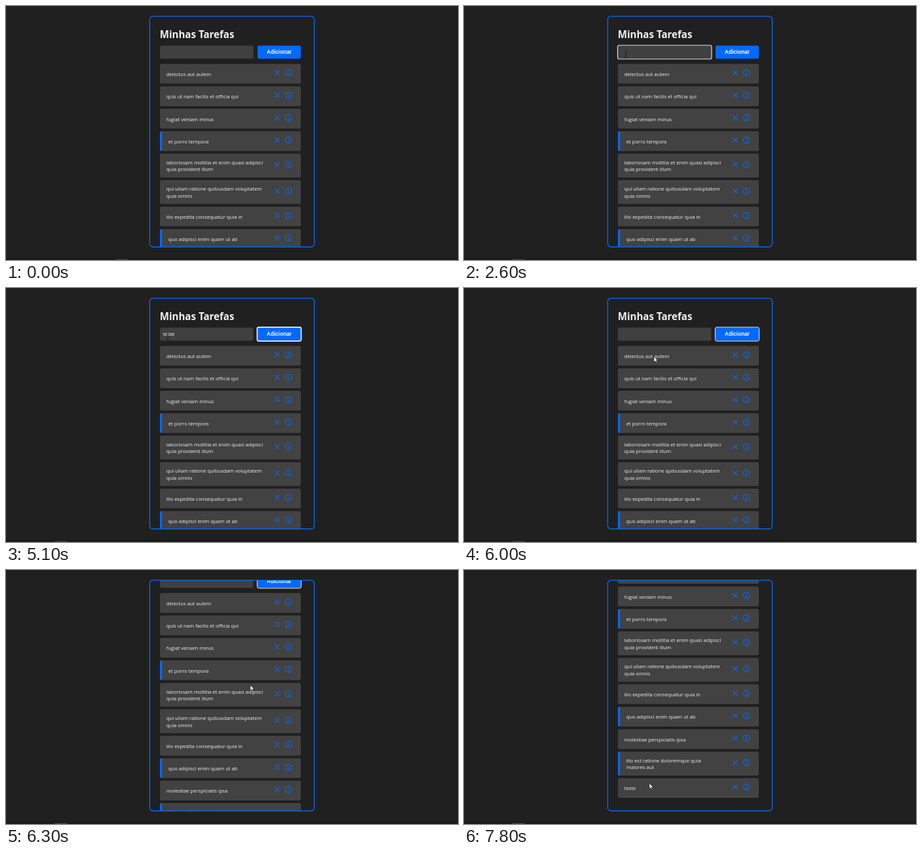
Write an HTML page that moves like this. It is 690 px wide and 388 px high and loops after 8000 ms.

```html
<!DOCTYPE html>
<html lang="pt">
<head>
<meta charset="utf-8">
<title>Minhas Tarefas</title>
<style>
  html, body { margin: 0; width: 100%; height: 100%; overflow: hidden; background: #202020; }
  svg { display: block; width: 100%; height: 100%; }
  text { font-family: "Open Sans", "Noto Sans", sans-serif; fill: #f0f0f0; white-space: pre; }
  .item { font-size: 7.65px; }
  .title { font-size: 15.1px; font-weight: 700; }
  .field, .button { font-family: "Liberation Sans", Arial, sans-serif; }
  .field { font-size: 8px; }
  .button { font-size: 8.2px; font-weight: 700; text-anchor: middle; fill: #fff; }
  .icon { fill: none; stroke: #0868ee; stroke-width: 1.15; stroke-linecap: round; }
</style>
</head>
<body>
<svg viewBox="0 0 690 388">
  <defs>
    <clipPath id="panel"><rect x="219.5" y="15.8" width="251" height="352" rx="5"/></clipPath>
    <clipPath id="cardEdge"><rect x="235" width="215" height="30.2" rx="2.2"/></clipPath>
    <clipPath id="tallEdge"><rect x="235" width="215" height="36.4" rx="2.2"/></clipPath>
  </defs>
  <rect width="690" height="388" fill="#202020"/>
  <rect y="384" width="690" height="4" fill="#1b1b1b"/>
  <rect id="taskMark" y="386.6" height="1.4" fill="#484848"/>
  <g clip-path="url(#panel)">
    <g id="content">
      <text class="title" x="234.7" y="48.9">Minhas Tarefas</text>
      <rect x="235" y="60.5" width="142.5" height="20" rx="2.2" fill="#404040"/>
      <rect id="fieldRing" x="234.5" y="60" width="143.5" height="21" rx="2.5" fill="none" stroke="#e6e6e6" stroke-width="1.2"/>
      <text id="typed" class="field" x="240" y="73.2"></text>
      <rect id="caret" y="66" width=".8" height="9.4" fill="#f0f0f0"/>
      <rect x="384" y="60.5" width="66" height="20" rx="2.2" fill="#006aff"/>
      <rect id="buttonRing" x="383.4" y="59.9" width="67.2" height="21.2" rx="2.5" fill="none" stroke="#f2f2f2"/>
      <text class="button" x="417" y="73.3">Adicionar</text>
      <g id="list"></g>
    </g>
  </g>
  <rect x="219.4" y="15.6" width="251.2" height="352.4" rx="5" fill="none" stroke="#066af5" stroke-width="1.3"/>
  <path id="arrow" d="M0 0V8L1.9 6.3 3.1 9 4.4 8.4 3.2 5.8H5.6Z" fill="#fff" stroke="#111" stroke-width=".5"/>
  <path id="beam" d="M-1.7 -4.2H-.4L0 -3.8 .4 -4.2H1.7M0 -3.8V3.8M-1.7 4.2H-.4L0 3.8 .4 4.2H1.7" fill="none" stroke="#101010" stroke-width=".8"/>
</svg>
<script>
const LOOP = 8000, STEP = 100;
const $ = id => document.getElementById(id);

const tasks = [
  { lines: ["delectus aut autem"] },
  { lines: ["quis ut nam facilis et officia qui"] },
  { lines: ["fugiat veniam minus"] },
  { lines: ["et porro tempora"], done: true },
  { lines: ["laboriosam mollitia et enim quasi adipisci", "quia provident illum"] },
  { lines: ["qui ullam ratione quibusdam voluptatem", "quia omnis"] },
  { lines: ["illo expedita consequatur quia in"] },
  { lines: ["quo adipisci enim quam ut ab"], done: true },
  { lines: ["molestiae perspiciatis ipsa"] },
  { lines: ["illo est ratione doloremque quia", "maiores aut"], done: true },
  { lines: ["teste"] }
];

function card({ lines, done }, top) {
  const tall = lines.length > 1;
  const height = tall ? 36.4 : 30.2;
  const iconY = tall ? 16.7 : 13.6;
  const firstLine = tall ? 16.2 : 18.5;
  const words = lines.map((line, i) =>
    `<text class="item" x="${done ? 247.8 : 244.8}" y="${firstLine + i * 10.7}">${line}</text>`).join("");
  const stripe = done
    ? `<rect x="235" width="3.1" height="${height}" fill="#006aff" clip-path="url(#${tall ? "tallEdge" : "cardEdge"})"/>`
    : "";
  return `<g transform="translate(0 ${top})">
    <rect x="235" width="215" height="${height}" rx="2.2" fill="#424242"/>${stripe}${words}
    <g class="icon" transform="translate(414 ${iconY})">
      <path d="M-3.4 -3.4L3.4 3.4M3.4 -3.4L-3.4 3.4"/>
      <circle cx="17.3" r="4.8"/><path d="M17.3 -.3V2.3M17.3 -2.3V-2.2"/>
    </g></g>`;
}

let top0 = 88.4;
$("list").innerHTML = tasks.map(task => {
  const markup = card(task, top0);
  top0 += task.lines.length > 1 ? 40.4 : 34.3;
  return markup;
}).join("");
const newCard = $("list").lastElementChild;

// Each key is [time, ...values], linear in between.
const scrollKeys = [[6100, 0], [6200, 1.6], [6300, 53.2], [6400, 106], [6500, 131.8]];
const pointerKeys = [
  [600, 612, 226], [900, 679, 185], [1100, 679, 185], [1300, 537, 160], [1500, 330, 95],
  [1700, 247, 75], [5900, 247, 75], [6000, 290, 105], [6100, 350, 152], [6200, 383.5, 172],
  [6300, 373, 176], [6500, 368, 178], [6600, 385, 220], [6800, 419, 326],
  [6900, 426, 332], [7100, 424, 328], [7400, 408, 325], [7600, 365, 322],
  [7700, 324, 326], [7800, 283, 326]
];
const typing = [[0, ""], [3100, "te"], [3400, "test"], [3600, "teste"], [5300, ""]];

function sample(keys, t) {
  const next = keys.findIndex(key => key[0] > t);
  if (next === 0) return keys[0].slice(1);
  if (next < 0) return keys[keys.length - 1].slice(1);
  const a = keys[next - 1], b = keys[next];
  const k = (t - a[0]) / (b[0] - a[0]);
  return a.slice(1).map((v, i) => v + (b[i + 1] - v) * k);
}

const within = (t, from, to) => t >= from && t < to;
const show = (node, on) => node.setAttribute("visibility", on ? "visible" : "hidden");

function render(time) {
  const t = Math.floor(time / STEP) * STEP;
  const [scroll] = sample(scrollKeys, t);
  $("content").setAttribute("transform", `translate(0 ${-scroll})`);

  const text = typing.filter(([start]) => start <= t).pop()[1];
  $("typed").textContent = text;
  $("caret").setAttribute("x", 239.7 + (text ? $("typed").getComputedTextLength() : 0));
  show($("caret"), within(t, 2000, 2600) || within(t, 3100, 4100) || within(t, 4700, 5100));
  show($("fieldRing"), within(t, 2000, 5100));
  show($("buttonRing"), t >= 5100);
  $("buttonRing").setAttribute("stroke-width", t < 5500 ? 1.6 : 1);
  show(newCard, t >= 5300);

  $("taskMark").setAttribute("x", t < 2000 ? 168 : 74);
  $("taskMark").setAttribute("width", t < 2000 ? 18 : 19);

  const [x, y] = sample(pointerKeys, t);
  const overField = within(t, 1600, 6000);
  for (const id of ["arrow", "beam"]) $(id).setAttribute("transform", `translate(${x} ${y})`);
  show($("arrow"), t >= 600 && !overField);
  show($("beam"), overField);
}

const start = performance.now();
function tick() {
  render((performance.now() - start) % LOOP);
  requestAnimationFrame(tick);
}
tick();
</script>
</body>
</html>
```
